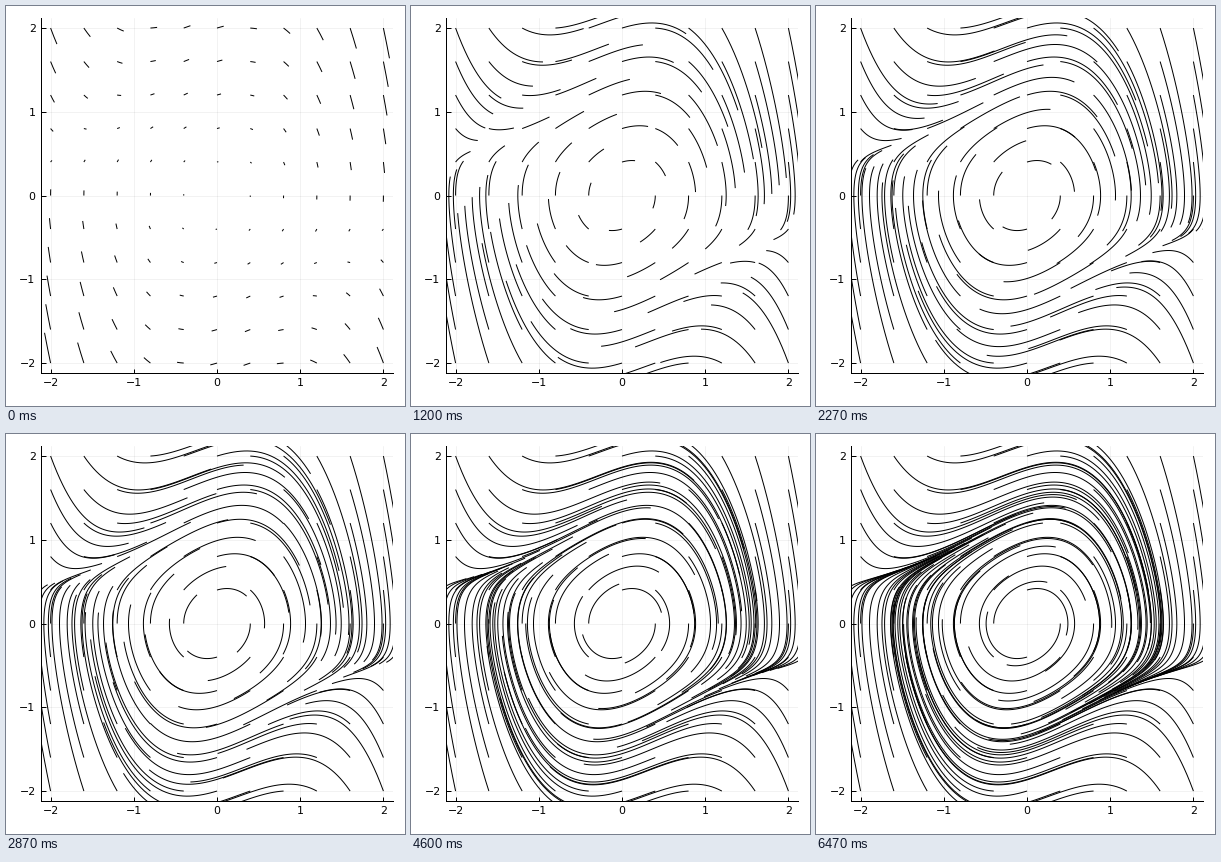
Write a matplotlib script that moves like this. It is 399 px wide and 400 px high and loops after 6.54 s.

```python
import numpy as np
import matplotlib.pyplot as plt
from matplotlib.animation import FuncAnimation
from matplotlib.collections import LineCollection

W, H, DPI = 399, 400, 100
PX = 72 / DPI                      # one pixel in points
LOOP, FRAMES = 6540, 98
DT, DAMP, LIM = 0.02, 0.3, 2.12

plt.rcParams["font.family"] = "DejaVu Sans"


def flow(s):
    """Van der Pol type oscillator."""
    x, y = s
    return np.array([y, (DAMP - x * x) * y - x])


def rk4(s, h):
    a = flow(s)
    b = flow(s + h / 2 * a)
    c = flow(s + h / 2 * b)
    d = flow(s + h * c)
    return s + h / 6 * (a + 2 * b + 2 * c + d)


def trajectories(steps):
    axis = np.linspace(-2, 2, 11)
    state = np.array(np.meshgrid(axis, axis)).reshape(2, -1)
    path = [state]
    for _ in range(steps):
        state = rk4(state, DT)
        path.append(state)
    return np.array(path).transpose(2, 0, 1)


paths = trajectories(FRAMES + 1)

fig = plt.figure(figsize=(W / DPI, H / DPI), dpi=DPI, facecolor="white")
left, right, top, bottom = 34.6, 387.4, 12, 367.1
ax = fig.add_axes([left / W, 1 - bottom / H, (right - left) / W, (bottom - top) / H])
ax.set(xlim=(-LIM, LIM), ylim=(-LIM, LIM))
ticks = range(-2, 3)
labels = [str(t).replace("-", "\u2212") for t in ticks]
ax.set_xticks(ticks, labels)
ax.set_yticks(ticks, labels)
ax.tick_params(direction="in", length=4.5 * PX, width=PX, labelsize=11 * PX)
ax.tick_params(axis="x", pad=5 * PX)
ax.tick_params(axis="y", pad=5 * PX)
ax.grid(color="black", alpha=0.1, linewidth=0.5 * PX)
ax.set_axisbelow(True)
for side in ("top", "right"):
    ax.spines[side].set_visible(False)
for side in ("left", "bottom"):
    ax.spines[side].set_linewidth(PX)

lines = LineCollection([], colors="black", linewidths=PX, capstyle="butt")
ax.add_collection(lines, autolim=False)


def draw(i):
    lines.set_segments(paths[:, : i + 3])
    return [lines]


anim = FuncAnimation(fig, draw, frames=FRAMES, interval=LOOP / FRAMES,
                     repeat=True, repeat_delay=0, blit=False)
plt.show()
```
